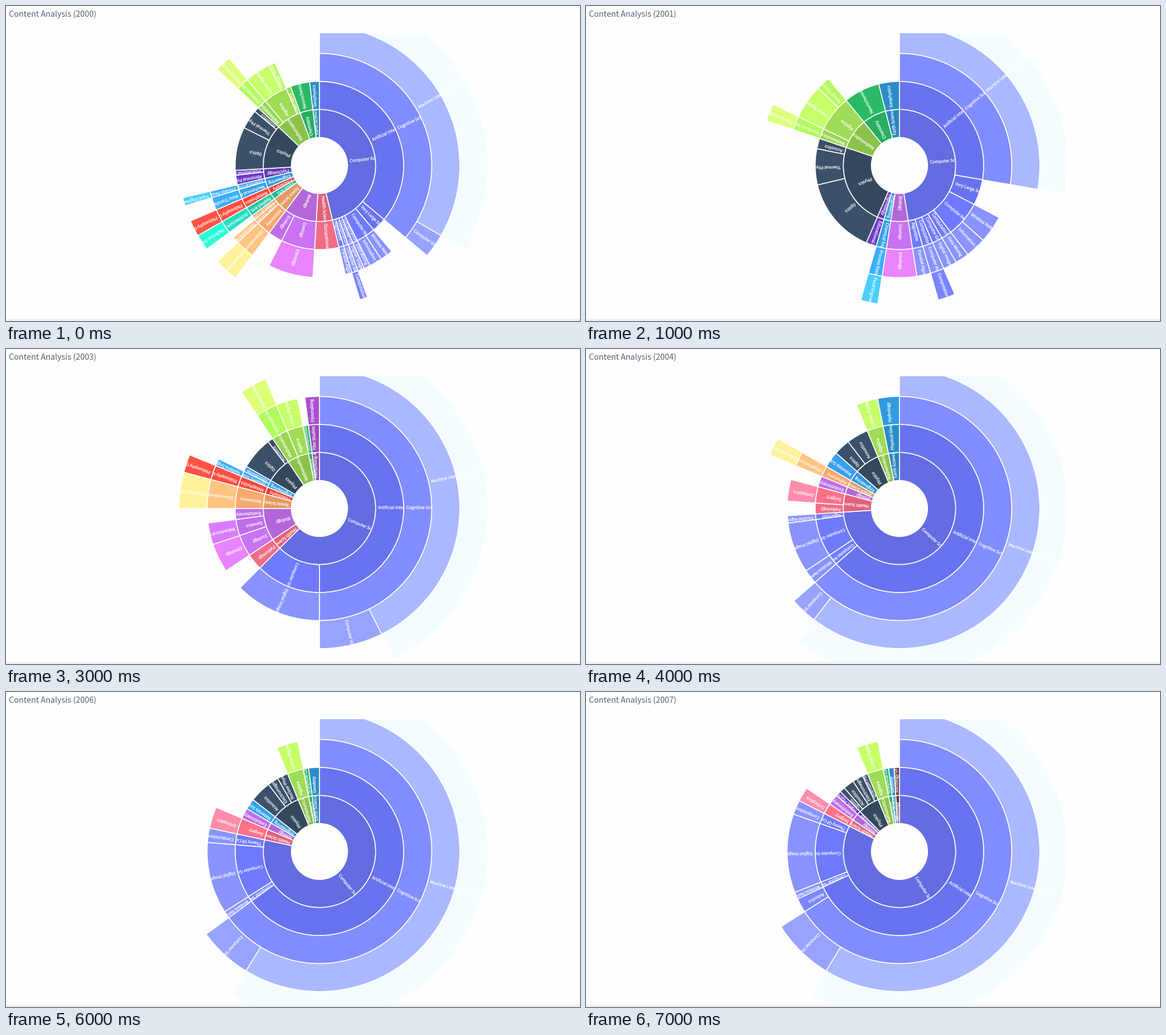
Recreate the animation shown at these times as a matplotlib script. Size 1009 by 555 pixels, loop 8 s.

```python
import matplotlib.pyplot as plt
from matplotlib.animation import FuncAnimation
from matplotlib.patches import PathPatch, Rectangle, Wedge
from matplotlib.textpath import TextPath
from matplotlib.transforms import Affine2D

W, H, DPI = 1009, 555, 72
CX, CY, RING = 551, 281, 49.38
BACKGROUND = "#fefefe"
FONT = "Noto Sans CJK JP"
FIRST_YEAR = 2000

TAXONOMY = """
Computer Science > Artificial Intelligence > Cognitive Science > Machine Learning > Supervised Learning
Cognitive Science > Computer Vision
Artificial Intelligence > Robotics
Computer Science > Very Large Scale Integration
Computer Science > Computer Networks > Wireless Networks
Computer Networks > Information Security
Computer Science > Computational Science > Data Mining
Computer Science > Computer Graphics > Digital Image Processing
Computer Science > Computational Logic > Computer Aided Design > Computational Geometry
Computer Science > Algorithm > Parallel Algorithm > Load Balancing
Algorithm > Computational Number Theory
Computer Science > Theory Of Computation > Computational Complexity
Health Science > Occupational Therapy
Health Science > Radiology
Health Science > Pathology
Health Science > Surgery > Orthoptics
Biology > Zoology > Ethology
Biology > Ecology
Biology > Genetics > Behavioural Genetics
Biology > Evolutionary Biology
Space Science > Astronomy > Observational Astronomy > Infrared Astronomy
Observational Astronomy > Radio Astronomy
Space Science > Other Matter > Fluid Dynamics
Space Science > Physical Cosmology
Visual Arts > Applied Arts > Architecture > Technical Drawing
Philosophy > Metaphysics > Philosophy Of Science > Philosophy Of Mind
Engineering > Mechanical Engineering > Mass Transfer
Mechanical Engineering > Aerospace Engineering > Avionics
Engineering > Chemical Engineering > Process Design > Food Engineering
Engineering > Systems Science > Systems Engineering
Engineering > Educational Technology
Engineering > Materials Science
Psychology > Abnormal Psychology
Psychology > Educational Psychology
Psychology > Traffic Psychology
Physics > Optics
Physics > Thermal Physics
Physics > Acoustics
Physics > Electromagnetism
Physics > Nuclear Physics
Physics > Solid Mechanics
Physics > Quantum Physics
Mathematics > Mathematical Analysis > Harmonic Analysis > Fourier Analysis
Mathematics > Algebra > Linear Algebra
Algebra > Group Theory
Mathematics > Geometry
Chemistry > Neurochemistry
Chemistry > Sonochemistry
Chemistry > Immunohistochemistry
Chemistry > Analytical Chemistry
Earth Science > Geophysics
Earth Science > Geodesy
Earth Science > Physical Geography > Hydrology
Performing Arts > Film Studies > Filmmaking
Sociology > Sociology Of Education
"""

# Document counts per leaf topic, clockwise from twelve o'clock.
YEARS = [
    """Supervised Learning 36, Computer Vision 3,
    Very Large Scale Integration 3, Wireless Networks 2,
    Information Security 2, Data Mining 1, Digital Image Processing 1,
    Computational Geometry 1, Load Balancing 1, Occupational Therapy 5,
    Ethology 7, Ecology 3, Infrared Astronomy 3, Fluid Dynamics 1,
    Physical Cosmology 1, Technical Drawing 2, Philosophy Of Mind 2,
    Mass Transfer 2, Food Engineering 1, Abnormal Psychology 2,
    Educational Psychology 1, Optics 9, Thermal Physics 4, Acoustics 1,
    Fourier Analysis 2, Linear Algebra 4, Group Theory 1, Geometry 1,
    Neurochemistry 4, Geophysics 2""",
    """Supervised Learning 28, Very Large Scale Integration 5,
    Wireless Networks 4, Information Security 3, Data Mining 2,
    Digital Image Processing 2, Computational Geometry 2, Load Balancing 2,
    Ethology 5, Food Engineering 2, Educational Psychology 2, Optics 15,
    Thermal Physics 7, Acoustics 2, Fourier Analysis 2, Linear Algebra 5,
    Group Theory 2, Neurochemistry 7, Geophysics 4""",
    """Supervised Learning 43, Computer Vision 3, Wireless Networks 3,
    Digital Image Processing 10, Computational Number Theory 1, Radiology 3,
    Orthoptics 3, Infrared Astronomy 2, Radio Astronomy 1,
    Technical Drawing 2, Avionics 2, Traffic Psychology 2, Optics 4,
    Acoustics 2, Electromagnetism 9, Linear Algebra 2, Sonochemistry 7,
    Immunohistochemistry 3""",
    """Supervised Learning 41, Computer Vision 7,
    Digital Image Processing 12, Pathology 3, Ethology 4,
    Behavioural Genetics 3, Evolutionary Biology 2, Infrared Astronomy 4,
    Philosophy Of Mind 2, Systems Engineering 1, Educational Technology 1,
    Optics 6, Acoustics 1, Fourier Analysis 3, Linear Algebra 3,
    Immunohistochemistry 1, Filmmaking 2""",
    """Supervised Learning 58, Computer Vision 3, Wireless Networks 2,
    Digital Image Processing 7, Load Balancing 1, Pathology 2, Orthoptics 3,
    Evolutionary Biology 2, Infrared Astronomy 2, Materials Science 3,
    Optics 3, Acoustics 4, Linear Algebra 3, Hydrology 3""",
    """Supervised Learning 58, Computer Vision 2, Information Security 2,
    Digital Image Processing 8, Load Balancing 1, Radiology 3, Orthoptics 4,
    Evolutionary Biology 1, Physical Cosmology 2, Materials Science 3,
    Acoustics 6, Nuclear Physics 3, Solid Mechanics 1, Hydrology 2""",
    """Supervised Learning 57, Computer Vision 6, Wireless Networks 1,
    Digital Image Processing 10, Computational Complexity 2, Orthoptics 3,
    Evolutionary Biology 2, Materials Science 2, Acoustics 4,
    Electromagnetism 2, Nuclear Physics 2, Linear Algebra 3,
    Analytical Chemistry 1, Geodesy 2""",
    """Supervised Learning 57, Computer Vision 7, Robotics 2,
    Wireless Networks 1, Digital Image Processing 11,
    Computational Complexity 2, Orthoptics 2, Evolutionary Biology 2,
    Traffic Psychology 1, Optics 1, Acoustics 2, Electromagnetism 2,
    Quantum Physics 1, Linear Algebra 3, Analytical Chemistry 1, Geodesy 1,
    Sociology Of Education 1""",
]

# One colour per ring, from the centre outwards.
PALETTES = {
    "Computer Science": "#636ce0 #6f7aff #8893ff #7984ff #f3fdff",
    "Health Science": "#e16079 #f16c85 #ff8cab",
    "Biology": "#b366d9 #bf6de8 #d97cff",
    "Space Science": "#e29a62 #f7a96e #ffc480 #fff29b",
    "Visual Arts": "#1db898 #1fcbab #24dfc0 #28ffd8",
    "Philosophy": "#f53e30 #fb4738 #ff4f40 #ff5343",
    "Engineering": "#2e97df #34a0ee #3aaeff #49cfff",
    "Psychology": "#6437b8 #6d3cc6",
    "Physics": "#34495e #3b5169",
    "Mathematics": "#8bc34a #9fdc55 #b2fb5c #dcff78",
    "Chemistry": "#27ae60 #2aba66",
    "Earth Science": "#2a85c0 #2b8cc9 #309be0",
    "Performing Arts": "#8e44ad #9b4abc #a950cf",
    "Sociology": "#65343f #6e3a46",
}
ACCENTS = {
    "Artificial Intelligence": "#6973f0",
    "Very Large Scale Integration": "#6973f0",
    "Cognitive Science": "#818cff",
    "Robotics": "#7c86ff",
    "Machine Learning": "#aab8ff",
    "Computer Vision": "#98a3ff",
    "Load Balancing": "#fcfdff",
    "Avionics": "#fcfdff",
    "Surgery": "#ff7189",
    "Zoology": "#c972f3",
    "Ethology": "#e884ff",
    "Radio Astronomy": "#fdd98c",
    "Mathematical Analysis": "#98d651",
    "Linear Algebra": "#c6ff69",
}

parent = {}
for line in TAXONOMY.strip().splitlines():
    names = line.split(" > ")
    parent.update(zip(names[1:], names))


def lineage(name):
    path = [name]
    while path[0] in parent:
        path.insert(0, parent[path[0]])
    return path


def partition(spec):
    """Map each topic to [start, end] degrees, parents before children."""
    leaves = [item.strip().rsplit(" ", 1) for item in spec.split(",")]
    unit = 360 / sum(int(count) for _, count in leaves)
    spans, done = {}, 0
    for leaf, count in leaves:
        start, done = done, done + int(count)
        for name in lineage(leaf):
            spans.setdefault(name, [start * unit, 0])[1] = done * unit
    return spans


def color_of(path):
    ring_colors = PALETTES[path[0]].split()
    return ACCENTS.get(path[-1], ring_colors[len(path) - 1])


def draw_topic(name, start, end):
    path = lineage(name)
    inner = RING * len(path)
    wedge = Wedge((CX, CY), inner + RING, start - 90, end - 90, width=RING,
                  fc=color_of(path), ec="white", lw=1.6)
    ax.add_patch(wedge)

    # Labels run outwards along the middle of the sector.
    turn = Affine2D().scale(1, -1).translate(inner + 4.5, 0.8)
    turn.rotate_deg((start + end) / 2 - 90).translate(CX, CY)
    glyphs = TextPath((0, 0), name, size=7.3, prop={"family": FONT})
    label = PathPatch(glyphs, fc="white", ec="white", lw=0.25,
                      transform=turn + ax.transData)
    ax.add_patch(label)
    label.set_clip_path(wedge)


def draw_year(index):
    ax.cla()
    ax.set(xlim=(0, W), ylim=(H, 0))
    ax.axis("off")
    for name, (start, end) in partition(YEARS[index]).items():
        draw_topic(name, start, end)
    ax.add_patch(Rectangle((0, 0), W, 48, fc=BACKGROUND, lw=0, zorder=4))
    ax.add_patch(Rectangle((0, 551), W, 4, fc="#f1f1f1", lw=0, zorder=4))
    ax.text(5, 19, f"Content Analysis ({FIRST_YEAR + index})", family=FONT,
            size=14.1, color="#5a6573", va="baseline", zorder=5)


fig = plt.figure(figsize=((W + 0.01) / DPI, (H + 0.01) / DPI), dpi=DPI,
                 facecolor=BACKGROUND)
ax = fig.add_axes([0, 0, 1, 1])
animation = FuncAnimation(fig, draw_year, frames=len(YEARS), interval=1000,
                          init_func=lambda: None, repeat=True, repeat_delay=0)
plt.show()
```
